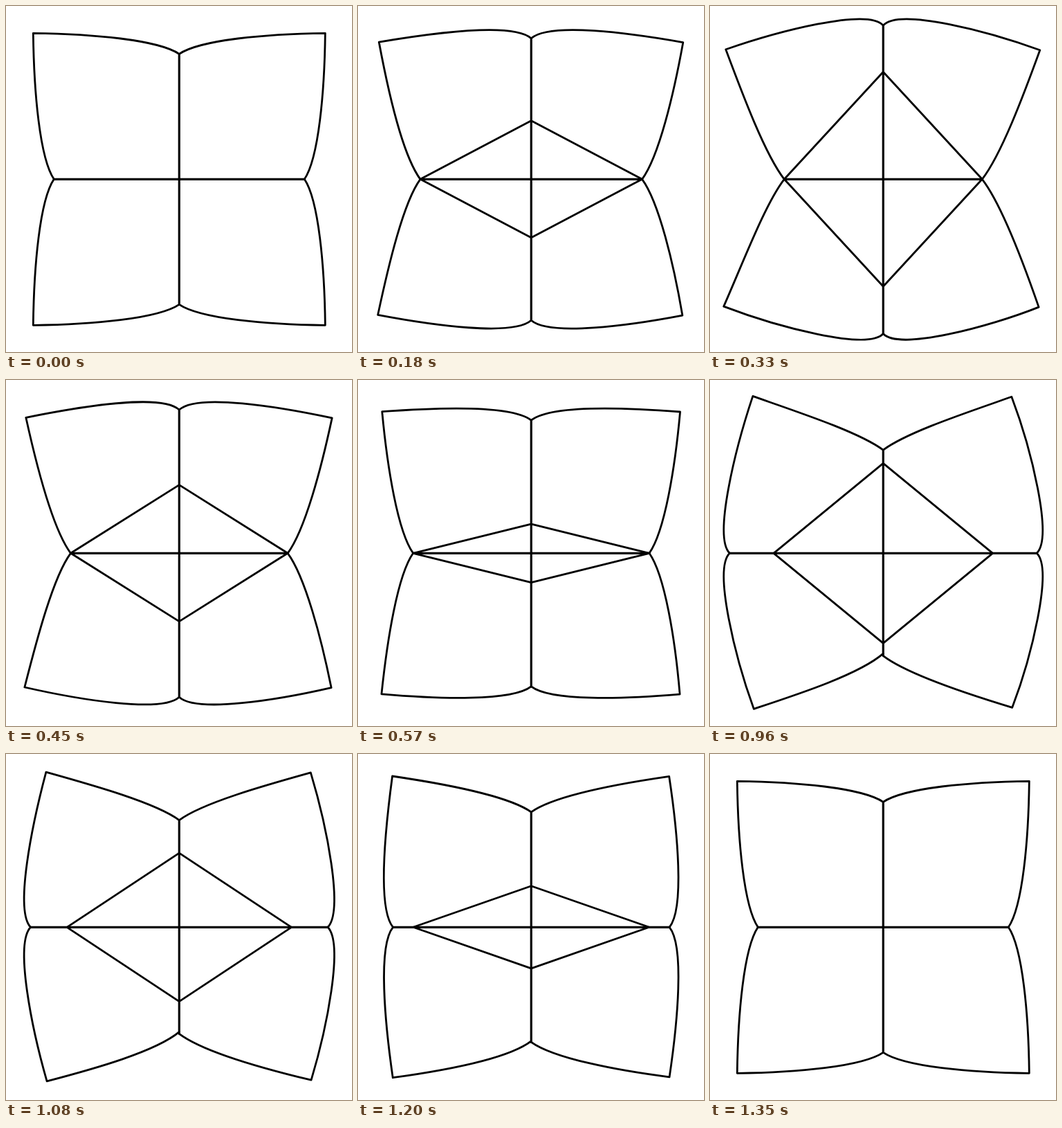
Write an HTML page that moves like this. It is 500 px wide and 500 px high and loops after 1.38 s.

```html
<!DOCTYPE html>
<html lang="en">
<head>
<meta charset="utf-8">
<title>Folding paper</title>
<style>
  html, body { margin: 0; width: 100%; height: 100%; overflow: hidden; background: #fff; }
  svg { display: block; width: 100vw; height: 100vh; }
  path { fill: none; stroke: #000; stroke-width: 2.8; stroke-linejoin: round; stroke-linecap: round; }
  #axes { stroke-width: 3.2; }
</style>
</head>
<body>
<svg viewBox="0 0 500 500">
  <g transform="translate(-0.2 -0.2)">
    <path id="flaps"/>
    <path id="mouth"/>
    <path id="axes"/>
  </g>
</svg>
<script>
const LOOP = 1380, STEP = 30, MID = 250.5;

// side: x of the left notch; edge/top: control points of the upper left flap;
// mouth: half width and half height of the diamond;
// flaps: corner x, corner y, notch y for upper left, upper right, lower left, lower right
const shut = {
  side: [69.5],
  edge: [40.5, 125, 49, 220],
  top: [125, 40.5, 220, 49],
  mouth: [181, 0],
  flaps: [39.5, 39.5, 69.5, 461.5, 39.5, 69.5, 39.5, 461.5, 431.5, 461.5, 461.5, 431.5]
};
const tall = {
  side: [107.5],
  edge: [48, 130, 80, 215],
  top: [95, 38, 228, 2],
  mouth: [143, 155],
  flaps: [23, 63, 28.3, 477, 64, 28.3, 20, 434.3, 473.7, 475.3, 435.3, 473.7]
};
const wide = {
  side: [24.5],
  edge: [37, 95, 0, 228],
  top: [130, 48, 215, 78],
  mouth: [156, 143],
  flaps: [64.3, 22, 104.5, 433.5, 23, 104.5, 65.9, 476.9, 392, 434.5, 474.7, 395.5]
};
const keys = [[0, shut], [330, tall], [660, shut], [990, wide], [1350, shut], [LOOP, shut]];

const el = id => document.getElementById(id);
const flip = v => 2 * MID - v;
const mix = (a, b, p) => a.map((v, i) => v + (b[i] - v) * p);

function poseAt(t) {
  const i = keys.findIndex(k => k[0] > t);
  const [t0, a] = keys[i - 1], [t1, b] = keys[i];
  const pose = {};
  for (const k in a) pose[k] = mix(a[k], b[k], (t - t0) / (t1 - t0));
  return pose;
}

function flap(pose, i) {
  const right = i % 2, low = i > 1;
  const [cx, cy, notch] = pose.flaps.slice(i * 3, i * 3 + 3);
  const pt = (x, y) => `${right ? flip(x) : x} ${low ? flip(y) : y}`;
  const [ax, ay, bx, by] = pose.edge;
  const [px, py, qx, qy] = pose.top;
  return `M${pt(pose.side[0], MID)}C${pt(bx, by)} ${pt(ax, ay)} ${cx} ${cy}` +
         `C${pt(px, py)} ${pt(qx, qy)} ${MID} ${notch}`;
}

function draw(t) {
  const pose = poseAt(t), f = pose.flaps, x = pose.side[0];
  const [w, h] = pose.mouth;
  el('flaps').setAttribute('d', [0, 1, 2, 3].map(i => flap(pose, i)).join(''));
  el('mouth').setAttribute('d',
    `M${MID - w} ${MID}L${MID} ${MID - h}L${MID + w} ${MID}L${MID} ${MID + h}Z`);
  el('axes').setAttribute('d',
    `M${x} ${MID}H${flip(x)}M${MID} ${f[2]}V${Math.max(f[8], f[11])}`);
}

const start = performance.now();
function tick() {
  const t = (performance.now() - start) % LOOP;
  draw(Math.floor(t / STEP) * STEP);
  requestAnimationFrame(tick);
}
tick();
</script>
</body>
</html>
```
